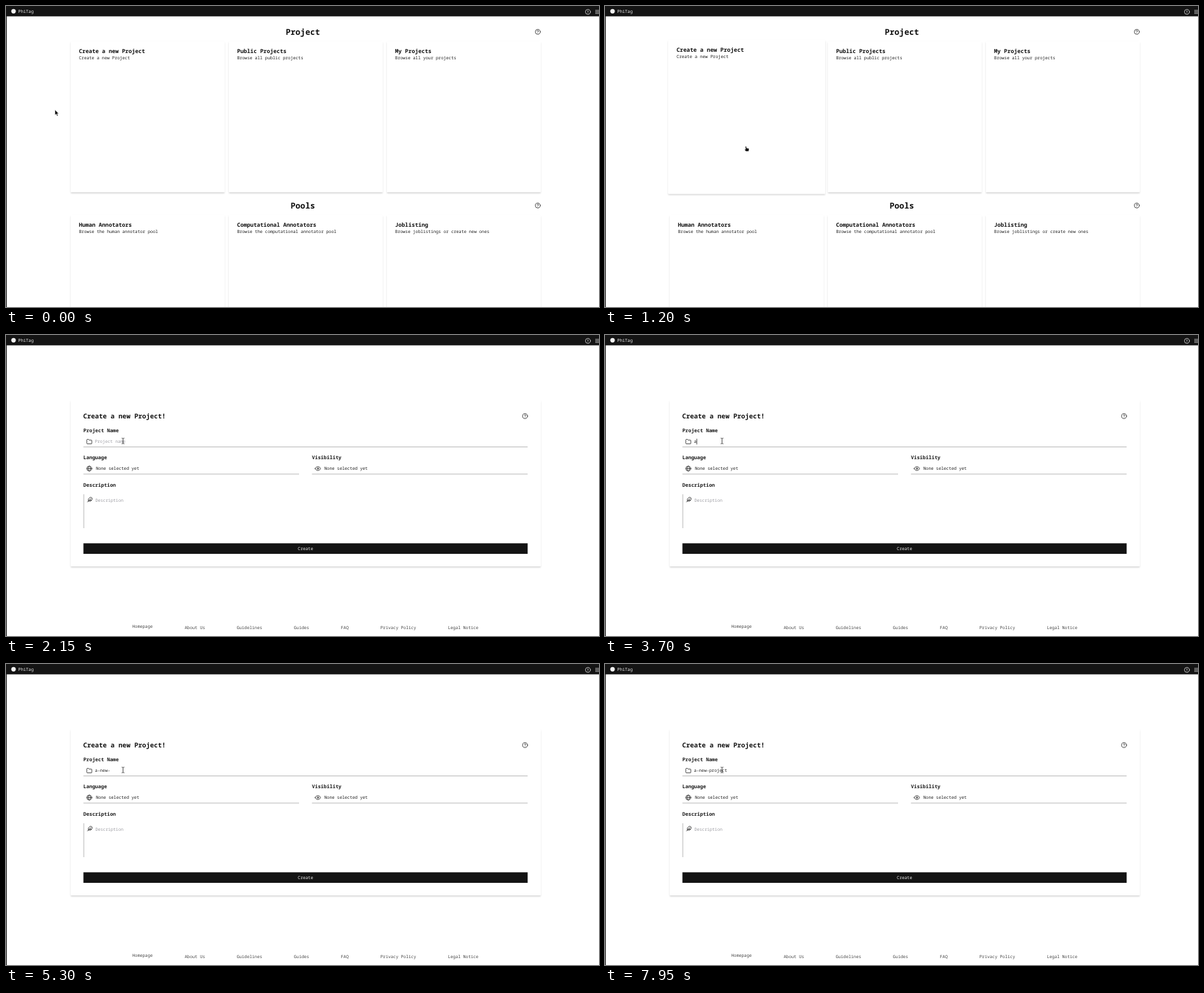
Write an HTML page that moves like this. It is 945 by 480 pixels and loops after 8 s.

```html
<!DOCTYPE html>
<html lang="en">
<head>
<meta charset="utf-8">
<title>Create a project</title>
<style>
  html, body { margin: 0; width: 100%; height: 100%; overflow: hidden; background: #fff; }
  svg { display: block; width: 945px; height: 480px; }
  text {
    font-family: "Noto Sans Mono", "DejaVu Sans Mono", monospace;
    font-size: 6.78px; font-weight: 500; fill: #1c1c1c;
    text-rendering: geometricPrecision; white-space: pre;
  }
  .h1 { font-size: 13px; font-weight: 700; fill: #111; }
  .h2 { font-size: 8.77px; font-weight: 600; fill: #111; }
  .h3 { font-size: 10.45px; font-weight: 700; fill: #111; }
  .label { font-size: 7.85px; font-weight: 600; }
  .hint { fill: #9c9ca2; font-weight: 400; }
  .link { fill: #444; font-weight: 400; }
  .light { fill: #f2f2f2; font-weight: 400; }
  .mid { text-anchor: middle; }
  .card { fill: #fff; filter: url(#shadow); }
  .icon { fill: none; stroke: #161616; stroke-width: 2; stroke-linecap: round; stroke-linejoin: round; }
  .rule { stroke: #b4b4b4; stroke-width: 1; }
</style>
</head>
<body>
<svg id="stage" viewBox="0 0 945 480" xmlns="http://www.w3.org/2000/svg">
  <defs>
    <filter id="shadow" x="-5%" y="-5%" width="110%" height="110%">
      <feDropShadow dx="0" dy="1.7" stdDeviation="1.2" flood-color="#000" flood-opacity=".17"/>
    </filter>
  </defs>
  <rect width="945" height="480" fill="#fff"/>
  <g id="home"></g>
  <g id="form"></g>
  <g id="bar"></g>
  <g id="pointer">
    <path id="arrow" d="M0 0V8.6L2 6.8 3.4 10 4.9 9.3 3.5 6.3H6.1Z" fill="#0a0a0a" stroke="#fff" stroke-width=".6"/>
    <path id="hand" d="M-.1 .2C.5-.5 1.3 0 1.5 .8L2 2.9 4.6 3.3C5.4 3.5 5.7 4 5.6 4.8L5.1 7.9H.6L-1.1 5.5C-1.4 4.8-.7 4.4 .3 5Z" fill="#0a0a0a" stroke="#fff" stroke-width=".4"/>
    <path id="beam" d="M-2-4.6Q0-4.6 0-3.4Q0-4.6 2-4.6M0-3.8V3.8M-2 4.6Q0 4.6 0 3.4Q0 4.6 2 4.6" fill="none" stroke="#333" stroke-width=".9"/>
  </g>
</svg>
<script>
const LOOP = 8000, STEP = 50, CHAR = 4.068;
const $ = id => document.getElementById(id);

const text = (x, y, s, cls = "") => `<text x="${x}" y="${y}" class="${cls}">${s}</text>`;
const rect = (x, y, w, h, attrs) => `<rect x="${x}" y="${y}" width="${w}" height="${h}" ${attrs}/>`;
const line = (x1, y1, x2, y2) => `<path class="rule" d="M${x1} ${y1}L${x2} ${y2}"/>`;

// Icons live on a 24 unit grid and are placed by their centre.
const shapes = {
  help: '<circle cx="12" cy="12" r="10"/><path d="M9 9a3 3 0 0 1 6 1c0 2-3 3-3 3M12 17h.01"/>',
  info: '<circle cx="12" cy="12" r="10"/><path d="M12 7v6M12 17h.01"/>',
  folder: '<path d="M22 19a2 2 0 0 1-2 2H4a2 2 0 0 1-2-2V5a2 2 0 0 1 2-2h5l2 3h9a2 2 0 0 1 2 2z"/>',
  globe: '<circle cx="12" cy="12" r="10"/><ellipse cx="12" cy="12" rx="4.3" ry="10"/><path d="M2 12H22"/>',
  eye: '<path d="M1 12Q5 4 12 4T23 12Q19 20 12 20T1 12Z"/><circle cx="12" cy="12" r="3"/>',
  feather: '<path d="M20 12a6 6 0 0 0-8-8L5 10.500V19h8.500zM16 8L2 22M17.500 15H9"/>',
  menu: '<path d="M3 6H23M3 12H23M3 18H23"/>'
};
const icon = (name, x, y, attrs = "") =>
  `<g class="icon" ${attrs} transform="translate(${x} ${y}) scale(.4) translate(-12 -12)">${shapes[name]}</g>`;

const card = (x, y, title, note, id = "") => `<g id="${id}">
  ${rect(x, y + 56.5, 245, 240.5, 'class="card" rx="1"')}
  ${text(x + 13, y + 74.8, title, "h2")}${text(x + 13, y + 85.2, note)}</g>`;

const section = (y, title, cards) =>
  text(473, y + 45.7, title, "h1 mid") + icon("help", 847.5, y + 41.2) +
  cards.map(([name, note, id], i) => card(103.3 + i * 251.9, y, name, note, id)).join("");

$("bar").innerHTML =
  rect(0, 0, 945, 16.5, 'fill="#141414"') + rect(0, 0, 1.2, 480, 'fill="#141414"') +
  '<circle cx="12" cy="8.300" r="3.600" fill="#f2f2f2"/>' +
  text(19.6, 10.8, "PhiTag", "light") +
  icon("info", 927.4, 9.4, 'style="stroke:#f2f2f2"') + icon("menu", 943, 9.4, 'style="stroke:#f2f2f2"');

$("home").innerHTML =
  section(0, "Project", [
    ["Create a new Project", "Create a new Project", "target"],
    ["Public Projects", "Browse all public projects"],
    ["My Projects", "Browse all your projects"]]) +
  section(277, "Pools", [
    ["Human Annotators", "Browse the human annotator pool"],
    ["Computational Annotators", "Browse the computational annotator pool"],
    ["Joblisting", "Browse joblistings or create new ones"]]);

const links = [[201.3, "Homepage"], [284.8, "About Us"], [367.7, "Guidelines"], [458.8, "Guides"],
  [533.8, "FAQ"], [596.8, "Privacy Policy"], [704.2, "Legal Notice"]];

$("form").innerHTML =
  rect(103.3, 104, 748.8, 265, 'class="card" rx="1"') +
  text(123, 132.8, "Create a new Project!", "h3") + icon("help", 827.2, 129.3) +
  text(123.3, 155, "Project Name", "label") + icon("folder", 132.8, 170) +
  '<text id="name" x="141.700" y="172.300"></text>' +
  '<path id="caret" d="M0 165.500V174.500" stroke="#111" stroke-width=".8"/>' + line(123.4, 178.5, 831.3, 178.5) +
  text(123.3, 198, "Language", "label") + icon("globe", 132.8, 213) +
  text(143.2, 215.3, "None selected yet") + line(123.4, 221.8, 467, 221.8) +
  text(487.5, 198, "Visibility", "label") + icon("eye", 497, 213) +
  text(507.3, 215.3, "None selected yet") + line(487.6, 221.8, 831.3, 221.8) +
  text(123.3, 241.5, "Description", "label") + icon("feather", 134, 262.2) +
  text(142.4, 265.7, "Description", "hint") + line(124, 254, 124, 308) +
  rect(123.4, 332.2, 707.9, 16.8, 'fill="#141414"') + text(477.3, 343, "Create", "light mid") +
  links.map(([x, s], i) => text(x, i ? 469.2 : 467.2, s, "link")).join("");

// Pointer path: time, x, y
const path = [[550, 78, 165.5], [650, 70, 176], [700, 77, 194], [750, 97, 207], [800, 118.6, 212.6],
  [900, 160, 218], [1000, 191, 221.5], [1100, 213, 223.5], [1200, 223.8, 223.8],
  [1600, 223.8, 223.8], [1650, 222.4, 223.8], [1750, 217, 214], [1850, 206, 195],
  [1950, 195, 178], [2050, 188.5, 171], [2150, 186.5, 169]];
const typed = "a-new-project";
const keys = [3700, 3850, 4500, 4600, 4800, 4950, 5650, 6000, 6200, 6500, 6650, 6850, 7000];
const caretOn = [[2900, 4200], [4500, 5300], [5650, 7700]];

function pointerAt(t) {
  const i = path.findIndex(p => p[0] > t);
  if (i === 0) return path[0].slice(1);
  if (i < 0) return path[path.length - 1].slice(1);
  const [t0, x0, y0] = path[i - 1], [t1, x1, y1] = path[i];
  const k = (t - t0) / (t1 - t0);
  return [x0 + (x1 - x0) * k, y0 + (y1 - y0) * k];
}

const show = (id, on) => $(id).setAttribute("display", on ? "inline" : "none");

function draw(t) {
  const onForm = t >= 1650;
  show("home", !onForm);
  show("form", onForm);

  const k = Math.min(1, Math.max(0, (t - 800) / 300));
  const scale = 1 + .021 * k * k * (3 - 2 * k);
  $("target").setAttribute("transform", `translate(225.8 176.700) scale(${scale}) translate(-225.8 -176.700)`);

  const count = keys.filter(at => at <= t).length;
  $("name").textContent = count ? typed.slice(0, count) : "Project name";
  $("name").setAttribute("class", count ? "" : "hint");
  $("caret").setAttribute("transform", `translate(${142.2 + count * CHAR} 0)`);
  show("caret", caretOn.some(([a, b]) => t >= a && t < b));

  const [x, y] = pointerAt(t);
  const kind = onForm ? (y < 178 ? "beam" : "arrow") : (x > 103 ? "hand" : "arrow");
  for (const id of ["arrow", "hand", "beam"]) show(id, id === kind);
  $("pointer").setAttribute("transform", `translate(${x} ${y})`);
}

function tick() {
  draw(Math.floor(performance.now() % LOOP / STEP) * STEP);
  requestAnimationFrame(tick);
}
tick();
</script>
</body>
</html>
```
